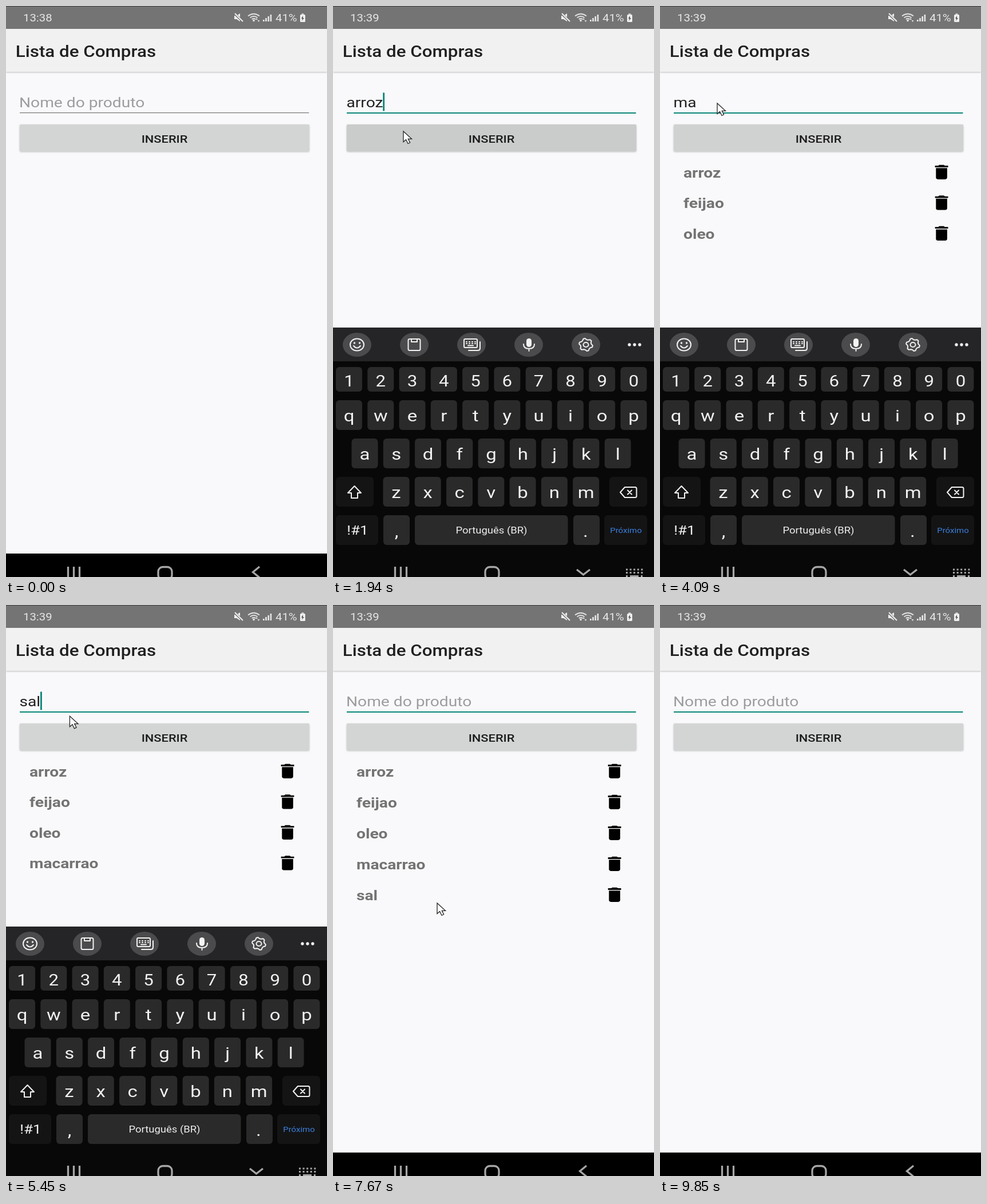
Write an HTML page that moves like this. It is 561 by 998 pixels and loops after 9.97 s.

```html
<!DOCTYPE html>
<html lang="pt-BR">
<head>
<meta charset="utf-8">
<title>Lista de Compras</title>
<style>
  html, body { margin: 0; width: 100%; height: 100%; overflow: hidden; background: #f9f9fb; }
  svg { display: block; width: 100vw; height: 100vh; }
  text { font-family: Roboto, "Noto Sans", sans-serif; white-space: pre; }
  .raised { filter: drop-shadow(0 1px 1.5px rgba(0, 0, 0, .25)); }
  .line { fill: none; stroke: #f2f2f2; stroke-width: 2; stroke-linecap: round; stroke-linejoin: round; }
</style>
</head>
<body>
<svg id="stage" viewBox="0 0 561 998" preserveAspectRatio="none"></svg>
<script>
const LOOP = 9970;
const ASPECT = 1.155; // the phone screen is shown wider than tall
const TEAL = '#078577';
const FOCUS = 500, TAP_BACK = 6390, KEY_TIME = 85, BLINK = 414, LAST_BLINK = 9790;

// Products are added at a steady pace and removed from the bottom up.
const ITEMS = ['arroz', 'feijao', 'oleo', 'macarrao', 'sal'].map((word, i) => {
  const from = 1130 + 950 * i;
  return { word, from, typed: from + word.length * KEY_TIME, added: from + 850, removed: 9050 - 225 * i };
});

const clamp = v => Math.max(0, Math.min(1, v));
const ramp = (t, from, length) => clamp((t - from) / length);
const rect = (x, y, w, h, fill, r = 0, more = '') =>
  `<rect x="${x}" y="${y}" width="${w}" height="${h}" rx="${r}" fill="${fill}" ${more}/>`;
const line = (d, more = '') => `<path class="line" d="${d}" ${more}/>`;
const label = (s, x, y, size, fill, { weight = 400, anchor = 'start', id = '' } = {}) =>
  `<text id="${id}" transform="translate(${x} ${y}) scale(${ASPECT} 1)" font-size="${size}"
    font-weight="${weight}" text-anchor="${anchor}" fill="${fill}">${s}</text>`;

// The pointer rests at a few places and eases from one to the next.
function pointerStops() {
  const stops = [];
  const stay = (from, to, x, y) => stops.push({ from, to, x, y });
  stay(0, 90, -18, 262);
  ITEMS.forEach(({ from, typed, added }, i) => {
    if (i) stay(from, typed, 100, 170);
    else stay(FOCUS - 20, typed, 70, 168);
    stay(added - 60, added + 80, 123, 219);
  });
  stay(TAP_BACK - 10, TAP_BACK + 170, 397, 953);
  stay(7480, 7740, 182, 521);
  [...ITEMS].reverse().forEach(({ removed }, i) =>
    stay(removed - 60, removed + 20, 490, 504 - 54 * i));
  stay(9640, LOOP, -18, 292);
  return stops;
}
const STOPS = pointerStops();

function pointerAt(t) {
  const i = STOPS.findIndex(s => t <= s.to);
  const b = STOPS[i], a = STOPS[i - 1] || b;
  const p = t >= b.from ? 1 : ramp(t, a.to, b.from - a.to);
  const e = p * p * (3 - 2 * p);
  return [a.x + (b.x - a.x) * e, a.y + (b.y - a.y) * e];
}

function statusBar() {
  const bars = [0, 1, 2, 3].map(i => rect(449 + i * 4.2, 24 - i * 3, 2.6, 3 + i * 3, '#e6e6e6')).join('');
  const arcs = [10, 6.5, 3.2].map(r => `<path d="M${433 - r} ${26 - r * .85}Q433 ${26 - r * 1.6} ${433 + r} ${26 - r * .85}"
    fill="none" stroke="#e0e0e0" stroke-width="2"/>`).join('');
  return rect(0, 0, 561, 40, '#747474') + rect(0, 0, 561, 1, '#3c3c3c') +
    label('13:38', 30, 27, 17.6, '#e6e6e6', { id: 'clock' }) +
    `<path d="M399 17h4l6-4v14l-6-4h-4z" fill="#f0f0f0"/>
     <path d="M399 13l15 14" stroke="#747474" stroke-width="4"/>
     <path d="M400 13l14 14" stroke="#f0f0f0" stroke-width="2"/>` +
    arcs + '<circle cx="433" cy="25.5" r="1.8" fill="#e6e6e6"/>' +
    '<path d="M436 24l2-3 2 3zM439.5 25l2 3 2-3z" fill="#ddd"/>' + bars +
    label('41%', 471, 27, 17.6, '#e6e6e6') +
    rect(516.5, 13, 4, 2, '#ccc') + rect(514, 15, 9, 13, '#f0f0f0', 1.5) +
    '<path d="M519 17l-3 5h2l-1 4 4-5h-2z" fill="#555"/>';
}

function page() {
  const bin = 'M6 19c0 1.1.9 2 2 2h8c1.1 0 2-.9 2-2V7H6zM19 4h-3.5l-1-1h-5l-1 1H5v2h14z';
  const rows = ITEMS.map(({ word }) => '<g class="row">' +
    label(word, 41, 0, 24.4, '#737373', { weight: 700 }) +
    `<path transform="translate(472.5 -26.2) scale(1.63 1.4)" d="${bin}"/></g>`).join('');
  return rect(0, 40, 561, 75, '#f1f1f1', 0, 'class="raised"') + statusBar() +
    label('Lista de Compras', 16.8, 89, 27.1, '#202020', { weight: 500 }) +
    label('Nome do produto', 23, 176.5, 24.4, '#9d9d9f', { id: 'hint' }) +
    label('', 23.5, 176.5, 24.4, '#222', { id: 'typed' }) +
    rect(24, 186, 505.5, 1.2, '#777', 0, 'id="underline"') +
    rect(0, 151.5, 2.8, 32, TEAL, 0, 'id="caret"') +
    rect(24, 207, 506, 47, '#d3d5d4', 2, 'id="button" class="raised"') +
    label('INSERIR', 277, 238.5, 18.9, '#1c1c1c', { weight: 500, anchor: 'middle' }) + rows;
}

function toolIcons() {
  const gear = Array.from({ length: 24 }, (_, i) => {
    const a = (i + .5) * Math.PI / 12, r = i % 4 < 2 ? 12 : 9.6;
    return `${442 + r * Math.cos(a)} ${30 + r * .92 * Math.sin(a)}`;
  }).join('L');
  const dot = (x, y, r) => `<circle cx="${x}" cy="${y}" r="${r}" fill="#eee"/>`;
  const discs = [0, 1, 2, 3, 4].map(i =>
    `<ellipse cx="${42 + 100 * i}" cy="30" rx="25" ry="21" fill="#4b4b4d"/>`).join('');
  return discs +
    '<ellipse class="line" cx="42" cy="30" rx="12" ry="10.5"/>' +
    dot(37.5, 27, 1.7) + dot(46.5, 27, 1.7) + line('M36 32q6 7 12 0') +
    line('M134 20h16q2.5 0 2.5 2.5v15q0 2.5-2.5 2.5h-16q-2.5 0-2.5-2.5v-15q0-2.5 2.5-2.5zM137 20v5h10v-5') +
    line('M231 20h19q2 0 2 2v11q0 2-2 2h-19q-2 0-2-2v-11q0-2 2-2zM257 25v11q0 4-4 4h-16') +
    line('M233 25h16M233 28h16', 'stroke-dasharray="1 4"') + line('M236 31.5h9') +
    rect(338, 19, 9, 15, '#f4f4f4', 4.5) + line('M333 29q0 8 9.5 8t9.5-8M342.5 37v4') +
    line(`M${gear}z`) + '<ellipse class="line" cx="442" cy="30" rx="4.5" ry="4"/>' +
    [0, 1, 2].map(i => dot(518 + i * 9, 30, 2.7)).join('');
}

function keyboard() {
  const key = (x, y, w, h, fill = '#2a2a2b') => rect(x, y, w, h, fill, 6);
  const row = (chars, x0, y, h, size) => [...chars].map((c, i) => {
    const x = x0 + i * 55.27;
    return key(x - 23, y, 46, h) +
      label(c, x, y + h / 2 + (h < 50 ? 12 : 10.5), size, '#f2f2f2', { anchor: 'middle' });
  }).join('');
  const dark = '#141415', mid = { anchor: 'middle' };
  return rect(0, 0, 561, 640, '#080808') + rect(0, 0, 561, 59, '#252527') + toolIcons() +
    row('1234567890', 28, 69, 43, 27) + row('qwertyuiop', 28, 127, 52, 28.5) +
    row('asdfghjkl', 55.5, 194, 52, 28.5) + row('zxcvbnm', 110.5, 261, 52, 28.5) +
    key(5, 261, 66, 52, dark) + line('M37.5 277L49 289h-6v9h-11v-9h-6z') +
    key(483, 261, 66, 52, dark) +
    line('M510 279h18q2.5 0 2.5 2.5v13q0 2.5-2.5 2.5h-18l-8-9zM515 284.5l7 7M522 284.5l-7 7') +
    key(5, 328, 74, 52, dark) + label('!#1', 43, 362, 22.5, '#f2f2f2', mid) +
    key(88, 328, 46, 52) + label(',', 111, 366, 29, '#f2f2f2', mid) +
    key(143, 328, 267.5, 52) + label('Português (BR)', 277, 360, 16, '#ececec', mid) +
    key(420, 328, 46, 52) + label('.', 441.5, 366, 29, '#f2f2f2', mid) +
    key(474, 328, 75, 52, dark) + label('Próximo', 512, 359, 13, '#3b80dd', mid);
}

const navIcons = () => [0, 1, 2].map(i => `<path d="M${108.5 + 10 * i} 980v20"/>`).join('') +
  '<rect x="266" y="980.5" width="24" height="22" rx="8"/>' +
  '<path id="back" d="M443 980l-11.5 9.5 11.5 9.5"/>' +
  '<g id="imeNav"><path d="M426 985l11.5 9 11.5-9"/>' +
  '<path d="M512 985h30M512 990.5h30" stroke-dasharray="3 3.6" stroke-width="3"/>' +
  '<path d="M519 996.5h15M512 996.5h3M538 996.5h3" stroke-width="3"/></g>';

const $ = id => document.getElementById(id);
$('stage').innerHTML = rect(0, 0, 561, 998, '#f9f9fb') + page() + rect(0, 957, 561, 41, '#000') +
  `<g id="keyboard">${keyboard()}</g>` +
  rect(355, 957, 165, 66, '#fff', 33, 'id="ripple"') +
  `<g id="nav" fill="none" stroke="#a6a6a6" stroke-width="3.3">${navIcons()}</g>
   <path id="pointer" d="M0 0v18.5l4.6-4 3.4 7 3.6-1.7-3.3-6.5h6.2z" fill="#fff" stroke="#222" stroke-width="1.3"/>`;
const rows = document.querySelectorAll('.row');
const show = (el, on) => el.setAttribute('visibility', on ? 'visible' : 'hidden');
const move = (el, x, y) => el.setAttribute('transform', `translate(${x} ${y})`);

function drawField(t) {
  const focused = t >= FOCUS;
  const item = ITEMS.find(({ from, added }) => t >= from && t < added);
  const text = item ? item.word.slice(0, Math.floor((t - item.from) / KEY_TIME) + 1) : '';
  $('typed').textContent = text;
  show($('hint'), !text);
  $('underline').setAttribute('fill', focused ? TEAL : '#777');
  $('underline').setAttribute('height', focused ? 2 : 1.2);
  $('caret').setAttribute('x', text ? 23.3 + $('typed').getComputedTextLength() * ASPECT : 24);
  show($('caret'), focused && Math.floor((LAST_BLINK - t) / BLINK) % 2 === 0);
}

function drawList(t) {
  const press = Math.max(...ITEMS.map(({ added }) => ramp(t, added - 50, 50) * (1 - ramp(t, added + 100, 120))));
  const grey = 212 - 40 * press;
  $('button').setAttribute('fill', `rgb(${grey - 1}, ${grey + 1}, ${grey})`);
  const pitch = t < TAP_BACK + 120 ? 53.55 : 54;
  rows.forEach((row, i) => {
    show(row, t >= ITEMS[i].added && t < ITEMS[i].removed);
    move(row, 0, 299.7 + i * pitch);
  });
}

function drawKeyboard(t) {
  const rise = (1 - ramp(t, 1125, 165)) ** 3, hide = ramp(t, TAP_BACK, 125);
  move($('keyboard'), 0, 562 + 436 * rise + 160 * hide);
  $('keyboard').setAttribute('opacity', 1 - hide);
  show($('keyboard'), rise < 1 && hide < 1);

  const ime = t >= 800 && t < TAP_BACK;
  show($('back'), !ime);
  show($('imeNav'), ime);
  $('ripple').setAttribute('opacity', .13 * ramp(t, TAP_BACK - 20, 60) * (1 - ramp(t, TAP_BACK + 90, 200)));
  $('nav').setAttribute('stroke', t > TAP_BACK && t < TAP_BACK + 300 ? '#eee' : '#a6a6a6');
}

function draw(t) {
  $('clock').textContent = t < 300 ? '13:38' : '13:39';
  drawField(t);
  drawList(t);
  drawKeyboard(t);
  move($('pointer'), ...pointerAt(t));
}

const start = performance.now();
function tick() {
  draw((performance.now() - start) % LOOP);
  requestAnimationFrame(tick);
}
tick();
</script>
</body>
</html>
```
